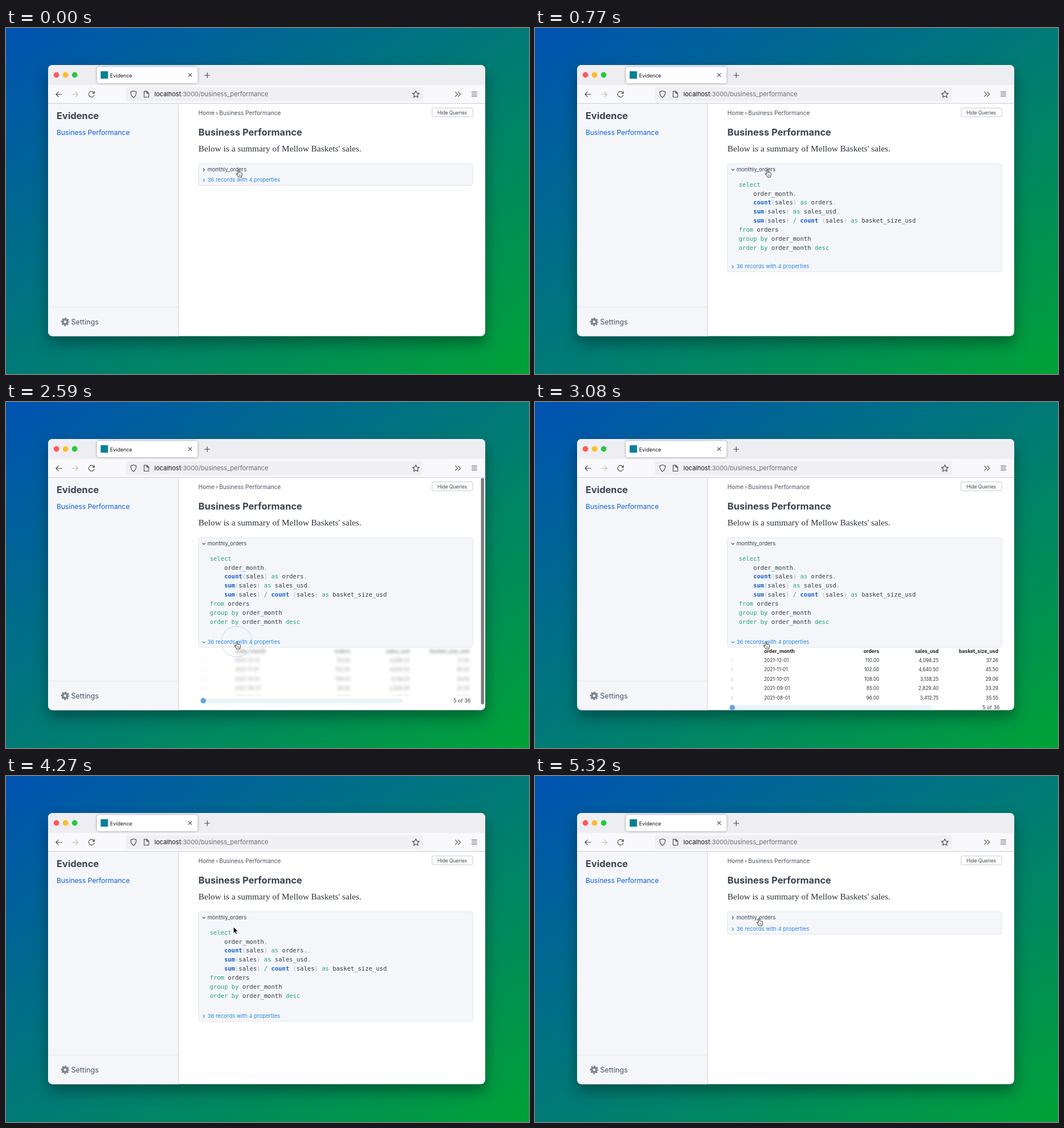
These frames come from a looping animation (920x608 px, 5.39 s). An HTML page:

```html
<!DOCTYPE html>
<html lang="en">
<head>
<meta charset="utf-8">
<title>Business Performance</title>
<style>
html, body { margin: 0; width: 100%; height: 100%; overflow: hidden; }
body { background: linear-gradient(to bottom right, #0052b2, #007a76 50%, #00a236); }
svg { display: block; width: 100%; height: 100%; }
text { font-family: Inter, sans-serif; fill: #3a4450; white-space: pre; }
.title { font-size: 16.5px; font-weight: 700; }
.crumb { font-size: 10.2px; fill: #4a5360; }
.label { font-size: 9.5px; }
.serif { font: 15.4px "Liberation Serif", serif; fill: #2a323b; }
.code { font: 10.56px "DejaVu Sans Mono", monospace; fill: #333b46; }
.keyword { fill: #25a276; }
.func { fill: #1461c8; font-weight: 700; }
.punct { fill: #b5bac3; }
.cell { font-size: 8.3px; fill: #2a2f36; }
.head { font-size: 8.6px; font-weight: 700; fill: #222; }
.end { text-anchor: end; }
.index { font-size: 7.5px; fill: #c4c8cd; }
.icon { fill: none; stroke: #4a4a52; stroke-width: 1.2; stroke-linecap: round; stroke-linejoin: round; }
.window { filter: drop-shadow(0 12px 13px rgba(0, 20, 20, .42)); }
.tab { filter: drop-shadow(0 0 2px rgba(0, 0, 0, .35)); }
</style>
</head>
<body>
<svg viewBox="0 0 920 608">
  <defs>
    <clipPath id="windowClip"><rect x="74" y="65" width="769" height="476.5" rx="8"/></clipPath>
    <clipPath id="codeClip"><rect id="codeBox" x="339" y="258" width="482" height="0"/></clipPath>
    <clipPath id="resultClip"><rect id="resultBox" x="338" y="431.5" width="484" height="0"/></clipPath>
    <clipPath id="tableClip"><rect id="tableBox" x="338" y="431.5" width="484" height="0"/></clipPath>
  </defs>

  <rect class="window" x="74" y="65" width="769" height="476.5" rx="8" fill="#fff"/>
  <g clip-path="url(#windowClip)">
    <!-- browser chrome -->
    <rect x="74" y="65" width="769" height="35" fill="#eeeef2"/>
    <rect x="74" y="100" width="769" height="32" fill="#f9f9fb"/>
    <rect x="74" y="132" width="769" height="1" fill="#cfcfd6"/>
    <circle cx="88.7" cy="82.5" r="4.9" fill="#fc5b57"/>
    <circle cx="104.7" cy="82.5" r="4.9" fill="#fdbc2e"/>
    <circle cx="120.8" cy="82.5" r="4.9" fill="#27c840"/>
    <rect class="tab" x="160" y="68.5" width="177" height="28.5" rx="3.5" fill="#fff"/>
    <rect x="166.5" y="76" width="13" height="13" fill="#0b7f94"/>
    <text x="183" y="86.5" font-size="9" style="fill:#15141a">Evidence</text>
    <g class="icon">
      <path d="M321 79.8l5.6 5.6m0-5.6l-5.6 5.6M349.5 83h9m-4.5-4.5v9"/>
      <path d="M98 116.5H88m4.3-4.3l-4.3 4.3 4.3 4.3"/>
      <path d="M116.500 116.500h10m-4.300-4.300l4.300 4.300-4.300 4.300" stroke="#bbbbc2"/>
      <path d="M155 114.300a5 5 0 1 0 .2 3.800M155.500 111.500v3.300h-3.300"/>
    </g>
    <rect x="211" y="104" width="522.5" height="24.5" rx="3.5" fill="#f0f0f4"/>
    <g class="icon">
      <path d="M224.300 110.500l4.800 1.600c.2 5-1.300 8-4.800 10-3.500-2-5-5-4.800-10z"/>
      <path d="M243 111.200h4.800l3.300 3.300v7h-8.100zM247.600 111.300v3.400h3.400"/>
      <path d="M721 110.500l1.800 3.800 4.200.5-3.100 2.900.8 4.200-3.700-2.100-3.700 2.100.8-4.200-3.100-2.900 4.200-.5z"/>
      <path d="M790.500 112.300l4 4-4 4m5-8l4 4-4 4M819.500 112.500h8.800m-8.800 3.500h8.800m-8.800 3.500h8.800"/>
    </g>
    <text x="261" y="120.400" font-size="11" style="fill:#6b6b74"><tspan fill="#15141a">localhost</tspan>:3000/business_performance</text>

    <!-- sidebar -->
    <rect x="74" y="133" width="229.500" height="409" fill="#f4f6fa"/>
    <rect x="303" y="133" width="1" height="409" fill="#cdd2d9"/>
    <rect x="74" y="490" width="229" height="1" fill="#e2e6eb"/>
    <text class="title" x="89" y="160">Evidence</text>
    <text x="89" y="188.200" font-size="12.100" style="fill:#0f5fd0">Business Performance</text>
    <g fill="none" stroke="#7b858f">
      <circle cx="104" cy="516.300" r="4" stroke-width="3.400"/>
      <circle cx="104" cy="516.300" r="6.200" stroke-width="2.400" stroke-dasharray="3 1.869" stroke-dashoffset="1.500"/>
    </g>
    <text x="114.500" y="521.300" font-size="12.600" style="fill:#4a5360">Settings</text>

    <!-- page -->
    <text class="crumb" x="338.500" y="152.800">Home</text>
    <text class="crumb" x="369" y="152.800">›</text>
    <text class="crumb" x="375" y="152.800">Business Performance</text>
    <rect x="749.500" y="140.500" width="71.500" height="15.500" rx="2" fill="#fff" stroke="#c5cad1"/>
    <text x="785" y="151.600" font-size="8.500" text-anchor="middle">Hide Queries</text>
    <text class="title" x="338.500" y="189">Business Performance</text>
    <text class="serif" x="338.500" y="217">Below is a summary of Mellow Baskets' sales.</text>

    <rect id="panel" x="338.500" y="238.500" width="482.500" height="38" rx="3.500" fill="#f4f6fa" stroke="#e1e5ec"/>
    <path id="queryChevron" class="icon" d="M-1 -2.200L1.200 0L-1 2.200"/>
    <text class="label" x="354.500" y="251.700">monthly_orders</text>
    <g id="code" clip-path="url(#codeClip)"></g>
    <g id="records">
      <path id="recordsChevron" class="icon" d="M-1 -2.200L1.200 0L-1 2.200" style="stroke:#2f86dd"/>
      <text class="label" x="354.500" y="270.200" style="fill:#2f86dd">36 records with 4 properties</text>
    </g>

    <g clip-path="url(#resultClip)">
      <g clip-path="url(#tableClip)"><g id="table"></g></g>
      <g id="pager">
        <rect x="343" y="-4" width="355" height="8" rx="3" fill="#e7f4f9"/>
        <circle cx="347" r="4.800" fill="#68a5e0"/>
        <text class="end" x="817.500" y="3.300" font-size="9.100">5 of 36</text>
        <rect x="338.500" y="7" width="482.500" height=".6" fill="#e9ecf0"/>
      </g>
    </g>
    <rect id="scrollbar" x="835.500" y="133.500" width="5.500" rx="2.700" fill="#7d7d7d"/>
  </g>

  <circle id="ring" fill="none" stroke="#7fb0ea"/>
  <g id="cursor" stroke-linejoin="round">
    <path id="arrow" d="M0 0v11.500l2.600-2.400 1.800 4 2-.9-1.800-3.900h3.600z" fill="#000" stroke="#fff" stroke-width=".9"/>
    <g id="hand" stroke="#222" stroke-width=".9">
      <path d="M-1.100 8.200V1.200a1.100 1.100 0 0 1 2.200 0V5q1-.7 1.900.2 1-.6 1.800.3 1.200-.4 1.600.9v2.800q0 1.600-1 2.600V13H-.2q-.6-1.600-2-3.100l-1.600-2q-.4-1.200.8-1.200z" fill="#fff"/>
      <path d="M1 8.600v2.300m1.600-2.300v2.300m1.600-2.300v2.300" stroke-width=".6"/>
    </g>
  </g>
</svg>

<script>
const LOOP = 5390, STEP = 70, SLIDE = 400;
const CODE_HEIGHT = 154.5, RESULT_HEIGHT = 121, TABLE_HEIGHT = 97, RESULT_TOP = 431.5;
const clicks = { showCode: 470, showRows: 2390, hideRows: 3476, hideCode: 5005 };
const path = [ // time, x, y of the pointer's hot spot
  [0, 409, 249], [1200, 409, 249], [1700, 406, 436], [1800, 406, 436],
  [2100, 406, 421], [4000, 406, 421], [4270, 400, 265], [4550, 394, 250], [LOOP, 394, 250]
];

const $ = id => document.getElementById(id);
const clamp = v => Math.min(1, Math.max(0, v));
const mix = (a, b, k) => a + (b - a) * k;
const cubicOut = k => 1 - (1 - k) ** 3;
const cubicInOut = k => k < .5 ? 4 * k ** 3 : 1 - 4 * (1 - k) ** 3;
const smooth = k => k * k * (3 - 2 * k);
const text = (cls, x, y, content) => `<text class="${cls}" x="${x}" y="${y}">${content}</text>`;
const set = (id, attributes) => {
  for (const name in attributes) $(id).setAttribute(name, attributes[name]);
};

const sql = `select
    order_month,
    count(sales) as orders,
    sum(sales) as sales_usd,
    sum(sales) / count (sales) as basket_size_usd
from orders
group by order_month
order by order_month desc`;
const highlight = line => line.replace(
  /\b(select|as|from|group|order|by|desc)\b|\b(count|sum)\b|([(),])|\//g,
  (token, keyword, func, punct) =>
    `<tspan class="${func ? 'func' : punct ? 'punct' : 'keyword'}">${token}</tspan>`);
$('code').innerHTML = sql.split('\n')
  .map((line, i) => text('code', 358.5, 278.8 + i * 15.83, highlight(line))).join('');

const columns = [[403, 'order_month'], [605.5, 'orders'], [710, 'sales_usd'], [815, 'basket_size_usd']];
const rows = [
  '2021-12-01 110.00 4,098.25 37.26',
  '2021-11-01 102.00 4,640.50 45.50',
  '2021-10-01 108.00 3,138.25 29.06',
  '2021-09-01 85.00 2,829.40 33.29',
  '2021-08-01 96.00 3,412.75 35.55'
];
const align = i => i ? ' end' : '';
$('table').innerHTML =
  columns.map(([x, name], i) => text('head' + align(i), x, 441.4, name)).join('') +
  rows.map((row, r) => {
    const y = 456.5 + r * 16.5;
    return text('index', 344.5, y, r + 1) +
      row.split(' ').map((value, i) => text('cell' + align(i), columns[i][0], y, value)).join('');
  }).join('');

const since = (t, start, duration) => clamp((t - start) / duration);
const toggle = (t, open, close, duration, ease) =>
  ease(since(t, open, duration)) - ease(since(t, close, duration));

function pointer(t) {
  const i = path.findIndex(p => p[0] > t);
  const [t0, x0, y0] = path[i - 1], [t1, x1, y1] = path[i];
  const k = smooth((t - t0) / (t1 - t0));
  return [mix(x0, x1, k), mix(y0, y1, k)];
}

function drawRing(t, x, y) {
  const click = Object.values(clicks).find(c => t >= c - 110 && t < c + 290);
  const age = t - click;
  set('ring', click === undefined ? { opacity: 0 } : {
    cx: x, cy: y,
    r: 22 + (age - 94) * .047,
    opacity: clamp((290 - age) / 190),
    'stroke-width': mix(2, 1, clamp((age - 94) / 106))
  });
}

function draw(t) {
  const code = toggle(t, clicks.showCode, clicks.hideCode, SLIDE, cubicOut);
  const result = toggle(t, clicks.showRows, clicks.hideRows, SLIDE, cubicOut);
  const turn = (open, close) => 90 * toggle(t, open, close, 190, k => k);

  set('panel', { height: 38 + CODE_HEIGHT * code });
  set('codeBox', { height: CODE_HEIGHT * code });
  set('records', { transform: `translate(0 ${CODE_HEIGHT * code})` });
  set('queryChevron', { transform: `translate(348 249.2) rotate(${turn(clicks.showCode, clicks.hideCode)})` });
  set('recordsChevron', { transform: `translate(348 267.6) rotate(${turn(clicks.showRows, clicks.hideRows)})` });

  set('resultBox', { height: RESULT_HEIGHT * result });
  set('tableBox', { height: TABLE_HEIGHT * result });
  set('pager', { transform: `translate(0 ${RESULT_TOP + TABLE_HEIGHT * result + 8.5})` });
  const sharp = cubicInOut(since(t, clicks.showRows, SLIDE));
  $('table').style.opacity = sharp;
  $('table').style.filter = sharp < 1 ? `blur(${5 * (1 - sharp)}px)` : 'none';

  const view = 408, content = RESULT_TOP + RESULT_HEIGHT * result + 13 - 133;
  set('scrollbar', {
    height: view * view / Math.max(view, content) - 1,
    opacity: content > view ? 1 - since(t, 2960, 110) : 0
  });

  const [x, y] = pointer(t);
  const pointing = t < 1260 || t >= 2030 && t < 4060 || t >= 4620;
  set('cursor', { transform: `translate(${x} ${y})` });
  set('hand', { opacity: +pointing });
  set('arrow', { opacity: +!pointing });
  drawRing(t, x, y);
}

const start = performance.now();
function tick() {
  const t = (performance.now() - start) % LOOP;
  draw(Math.floor(t / STEP) * STEP);
  requestAnimationFrame(tick);
}
tick();
</script>
</body>
</html>
```
